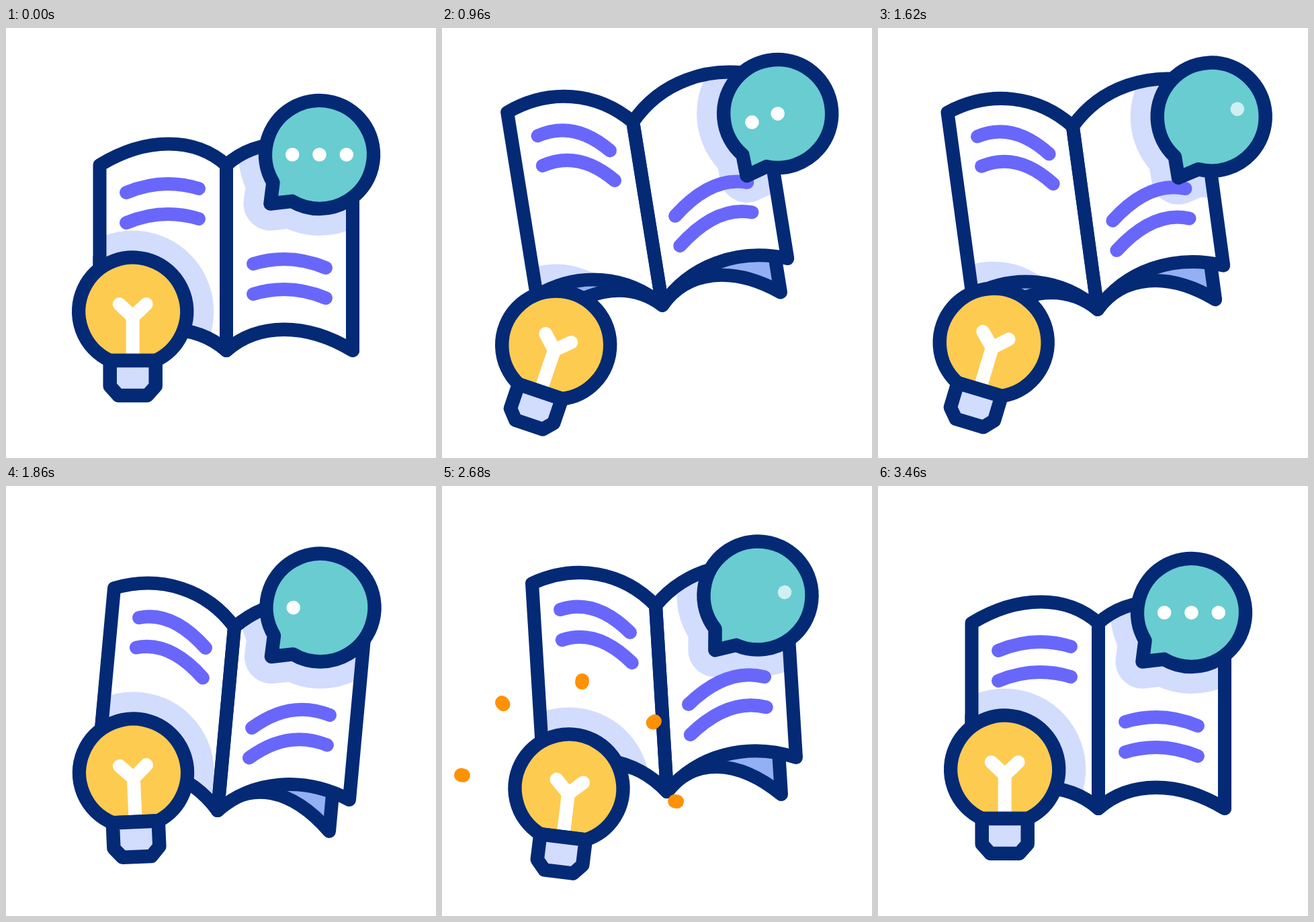
Recreate the animation shown at these times as an HTML page with a canvas. Size 640 px wide and 640 px high, loop 3600 ms.

```html
<!DOCTYPE html>
<html lang="en">
<head>
<meta charset="utf-8">
<title>Book, idea, talk</title>
<style>
  html, body { margin: 0; width: 100%; height: 100%; overflow: hidden; background: #fff; }
  canvas { display: block; width: 640px; height: 640px; }
</style>
</head>
<body>
<canvas id="stage" width="640" height="640"></canvas>
<script>
const LOOP = 3600;
const INK = '#042a75', PAPER = '#fff', SHADE = '#d2dcfd', UNDER = '#93b0f4';
const TEXT = '#6967fb', TEAL = '#68ccd1', YELLOW = '#fdcb50', SPARK = '#ff9104';
const ctx = document.getElementById('stage').getContext('2d');

// spine top, spine bottom, left span, right span, back left span, back right span, back bulge
const BOOK = [
  [328, 204, 328, 480, -188.5, 0, 188, 0, -188.5, 0, 188, 0, .15],
  [288, 143, 328, 415, -187, -21, 187, -70, -178, 32, 176, -17, .172],
  [278, 135, 328, 409, -187, -2, 185, -69, -178, 38, 176, -23, .175],
  [340, 210, 315, 483, -179, -58, 196, -16, -179, -54, 166, 31, .195],
  [340, 217, 310, 492, -179, -54, 195, -6, -179, -50, 174, 29, .2],
  [318, 178, 335, 455, -184, -33, 192, -51, -178, -5, 170, 4, .187]
];
// ends of the upper text line on each page, then its bulge
const LINES = [
  [179, 245, 287, 239, 368, 351, 476, 357, 13],
  [146, 157, 253, 184, 349, 282, 457, 231, 24],
  [137, 167, 245, 180, 344, 276, 450, 228, 21.5],
  [198, 196, 297, 241, 366, 360, 482, 341, 22],
  [196, 210, 297, 247, 364, 368, 478, 359, 20],
  [176, 184, 280, 218, 367, 325, 480, 284, 23]
];
// x, y, degrees of the bubble and of the bulb
const PROPS = [
  [466.5, 188.5, 0, 188.7, 422, 0],
  [497, 129, -17, 172, 471, 17.5],
  [504, 125, -21, 166, 473.5, 20.7],
  [468, 181, 0, 189.5, 427, -2.5],
  [467, 190, 2.5, 190.5, 420, -5.5],
  [470, 163, -7, 189, 450, 7]
];
const POSES = BOOK.map((b, i) => [...b, ...LINES[i], ...PROPS[i]]);

// time, pose a, pose b, share of b
const KEYS = [
  [60, 0, 0, 0], [540, 1, 1, 0], [1080, 1, 2, .5], [1340, 2, 2, 0],
  [1470, 1, 2, 1.85], [1640, 1, 3, .1], [1860, 3, 3, 0], [2200, 4, 4, 0],
  [2530, 4, 5, 1.12], [2680, 5, 5, 0], [3240, 5, 0, .97], [3460, 0, 0, 0]
].map(([t, a, b, k]) => ({ t, v: POSES[a].map((x, i) => x + (POSES[b][i] - x) * k) }));

const clamp = x => Math.min(1, Math.max(0, x));
const ramp = (t, a, b) => clamp((t - a) / (b - a));
const rad = d => d * Math.PI / 180;

// Monotone cubic slope at key k for component i
function slope(k, i) {
  if (k === 0 || k === KEYS.length - 1) return 0;
  const [p, q, r] = [KEYS[k - 1], KEYS[k], KEYS[k + 1]];
  const a = (q.v[i] - p.v[i]) / (q.t - p.t), b = (r.v[i] - q.v[i]) / (r.t - q.t);
  return a * b > 0 ? 2 * a * b / (a + b) : 0;
}

function poseAt(t) {
  const last = KEYS.length - 1;
  if (t <= KEYS[0].t) return KEYS[0].v;
  if (t >= KEYS[last].t) return KEYS[last].v;
  const k = KEYS.findIndex(key => key.t > t) - 1;
  const a = KEYS[k], b = KEYS[k + 1], h = b.t - a.t, s = (t - a.t) / h;
  const e = s * s * (3 - 2 * s);
  return a.v.map((x, i) => x + (b.v[i] - x) * e +
    h * s * (1 - s) * ((1 - s) * slope(k, i) - s * slope(k + 1, i)));
}

function pen(color, width, cap = 'round') {
  ctx.strokeStyle = color;
  ctx.lineWidth = width;
  ctx.lineCap = cap;
  ctx.lineJoin = 'round';
}

function poly(points) {
  const p = new Path2D();
  points.forEach(([x, y]) => p.lineTo(x, y));
  return p;
}

function fill(path, color) {
  ctx.fillStyle = color;
  ctx.fill(path);
}

function at(x, y, deg, draw) {
  ctx.save();
  ctx.translate(x, y);
  ctx.rotate(rad(deg));
  draw();
  ctx.restore();
}

const bubble = new Path2D();
bubble.arc(0, 0, 80.5, rad(149), rad(480.5));
bubble.lineTo(-73, 73);
bubble.closePath();

const glass = new Path2D();
glass.arc(0, 0, 80.5, rad(115), rad(425));
glass.closePath();
const socket = poly([[-34, 73], [34, 73], [34, 111], [21.5, 125], [-21.5, 125], [-34, 111]]);
socket.closePath();
const arms = poly([[-20, -11], [0, 8], [20, -11]]);
const stem = poly([[0, 8], [0, 73]]);

// Curved page edge from the spine outwards
function edge(path, x, y, [ux, uy], [vx, vy], b) {
  path.bezierCurveTo(x + .25 * ux - b * vx, y + .25 * uy - b * vy,
    x + .635 * ux - b * vx, y + .635 * uy - b * vy, x + ux, y + uy);
}

function backPage(tx, ty, bx, by, u, v, b) {
  const p = new Path2D();
  p.moveTo(bx, by);
  edge(p, bx, by, u, v, b);
  p.lineTo(bx + u[0] - v[0] / 2, by + u[1] - v[1] / 2);
  p.lineTo(tx, ty);
  p.closePath();
  return p;
}

function frontPage(tx, ty, bx, by, [ux, uy], v) {
  const p = new Path2D(), b = .152;
  const cx = k => bx + k * ux - b * v[0], cy = k => by + k * uy - b * v[1];
  p.moveTo(tx, ty);
  edge(p, tx, ty, [ux, uy], v, b);
  p.lineTo(bx + ux, by + uy);
  p.bezierCurveTo(cx(.635), cy(.635), cx(.25), cy(.25), bx, by);
  p.closePath();
  return p;
}

function textLine(x1, y1, x2, y2, bulge, dx, dy) {
  const w = (x2 - x1) / 3, h = (y2 - y1) / 3;
  const p = new Path2D();
  p.moveTo(x1 + dx, y1 + dy);
  p.bezierCurveTo(x1 + w + dx, y1 + h - bulge + dy,
    x2 - w + dx, y2 - h - bulge + dy, x2 + dx, y2 + dy);
  ctx.stroke(p);
}

function drawShade(bub, bulb) {
  pen(SHADE, 80);
  for (const [place, path] of [[bulb, glass], [bub, bubble]]) {
    at(...place, () => { fill(path, SHADE); ctx.stroke(path); });
  }
}

function drawBook(p, bub, bulb) {
  const [tx, ty, bx, by] = p;
  const v = [bx - tx, by - ty];
  const span = i => [p[i], p[i + 1]];

  pen(INK, 20);
  for (const i of [8, 10]) {
    const back = backPage(tx, ty, bx, by, span(i), v, p[12]);
    fill(back, UNDER);
    ctx.stroke(back);
  }

  const pages = [4, 6].map(i => frontPage(tx, ty, bx, by, span(i), v));
  pages.forEach(page => fill(page, PAPER));
  const both = new Path2D();
  pages.forEach(page => both.addPath(page));
  ctx.save();
  ctx.clip(both);
  drawShade(bub, bulb);
  ctx.restore();

  pen(INK, 20);
  pages.forEach(page => ctx.stroke(page));

  pen(TEXT, 20);
  for (const i of [13, 17]) {
    for (const s of [0, .163]) {
      textLine(p[i], p[i + 1], p[i + 2], p[i + 3], p[21], s * v[0], s * v[1]);
    }
  }
}

function drawSparks(t) {
  if (t < 2340 || t > 2740) return;
  const out = 1 - (1 - ramp(t, 2320, 2660)) ** 2;
  const tail = 1 - (1 - ramp(t, 2400, 2740)) ** 2;
  const r2 = 80 + 82 * out, r1 = Math.min(r2, 80 + 81 * tail);
  pen(SPARK, 20.5);
  for (let a = -180; a <= 0; a += 45) {
    const c = Math.cos(rad(a)), s = Math.sin(rad(a));
    ctx.stroke(poly([[r1 * c, r1 * s], [r2 * c, r2 * s]]));
  }
}

function drawBulb() {
  fill(glass, YELLOW);
  pen(PAPER, 20);
  ctx.stroke(arms);
  pen(PAPER, 20, 'butt');
  ctx.stroke(stem);
  pen(INK, 20.5);
  ctx.stroke(glass);
  fill(socket, SHADE);
  ctx.stroke(socket);
}

// Each dot leaves and returns in turn, three rounds per loop
function dotAlpha(t, i) {
  if (t >= 3180) return 1;
  const ph = t % 1060;
  const off = 100 + 215 * i, on = 680 + 140 * i;
  return 1 - ramp(ph, off, off + 100) + ramp(ph, on, on + 100);
}

function drawBubble(t) {
  fill(bubble, TEAL);
  pen(INK, 20.5);
  ctx.stroke(bubble);
  for (let i = 0; i < 3; i++) {
    ctx.globalAlpha = clamp(dotAlpha(t, i));
    const dot = new Path2D();
    dot.arc(40.3 * (i - 1), 0, 10.3, 0, 7);
    fill(dot, PAPER);
  }
  ctx.globalAlpha = 1;
}

function frame(now) {
  const t = now % LOOP;
  const p = poseAt(t);
  const bub = p.slice(22, 25), bulb = p.slice(25, 28);
  ctx.fillStyle = PAPER;
  ctx.fillRect(0, 0, 640, 640);
  drawBook(p, bub, bulb);
  at(...bulb, () => { drawSparks(t); drawBulb(); });
  at(...bub, () => drawBubble(t));
  requestAnimationFrame(frame);
}

let start;
requestAnimationFrame(function first(now) {
  start = now;
  const tick = n => n - start;
  const run = frame;
  run(tick(now));
});
</script>
</body>
</html>
```
